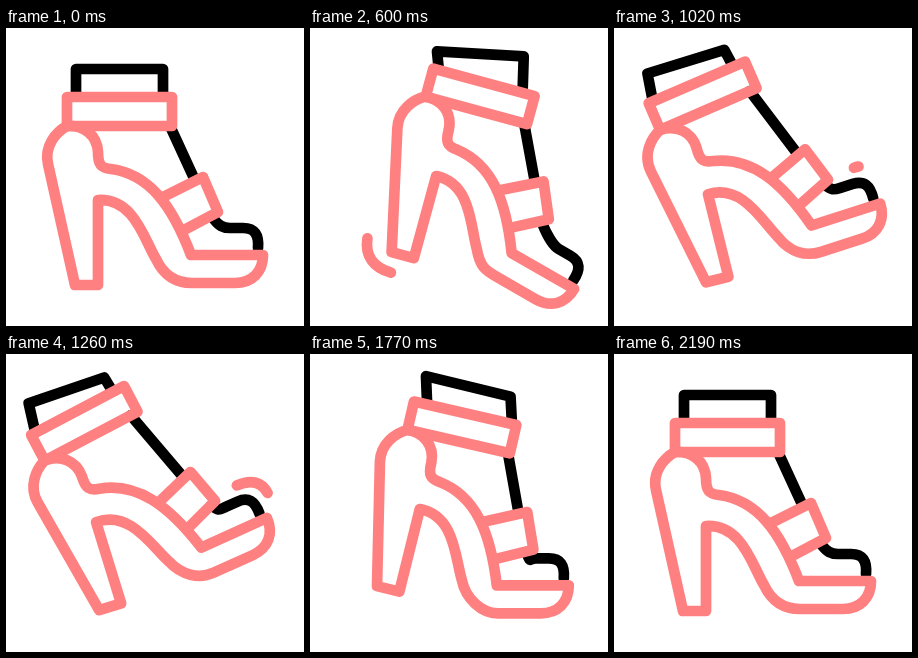
An HTML page for the animation above (2.25 s loop, 298 px wide and 298 px high).

```html
<!DOCTYPE html>
<html lang="en">
<head>
<meta charset="utf-8">
<title>Walking heel</title>
<style>
html, body { margin: 0; height: 100%; overflow: hidden; background: #fff; }
svg { display: block; width: 100%; height: 100%; }
path { fill: none; stroke: #ff8080; stroke-width: 10.7; stroke-linecap: round; stroke-linejoin: round; }
.ink { stroke: #000; }
</style>
</head>
<body>
<svg viewBox="0 0 298 298">
  <path id="sock" class="ink"/>
  <path id="shin" class="ink"/>
  <path id="toes" class="ink"/>
  <path id="strap"/>
  <path id="shoe"/>
  <path id="cuff"/>
  <path id="heelArc" pathLength="1"/>
  <path id="toeArc" pathLength="1"/>
</svg>
<script>
const LOOP = 2250, STEP = 30;
const times = [120, 630, 1170, 1740, 2190];

// Values at rest, heel up, toe up, heel up with flat toe; then back to rest.
const poses = {
  x: [110, 149.5, 99.5, 132.7],
  y: [150, 131.5, 142, 138],
  tilt: [0, 15.3, -18.4, 14],
  toeBend: [0, 14.7, -6.8, -14],
  cuffBend: [0, 0, -11, -1],
  leftX: [70, 60, 62.5, 66],
  leftY: [41, 51.5, 38.5, 41.4],
  rightX: [157, 145, 142, 153],
  rightY: [41, 33.5, 36, 41],
  legShift: [0, -4, -4, 4],
  shinShift: [0, -1, -6, 0],
  strapDrop: [0, 0, 3, 0]
};

// Progress of cubic-bezier(.5, 0, .5, 1) between two times.
function ease(t, from, to) {
  const x = Math.min(1, Math.max(0, (t - from) / (to - from)));
  let s = x;
  for (let i = 0; i < 6; i++) s -= (s * (1.5 - 1.5 * s + s * s) - x) / (1.5 - 3 * s + 3 * s * s);
  return s * s * (3 - 2 * s);
}

function poseAt(t) {
  let i = 0;
  while (i < 3 && t >= times[i + 1]) i++;
  const e = ease(t, times[i], times[i + 1]), pose = {};
  for (const key in poses) {
    const v = poses[key];
    pose[key] = v[i] + (v[(i + 1) % 4] - v[i]) * e;
  }
  return pose;
}

// Rigid frame: turns points around a pivot and moves the pivot to a place.
function rigid([px, py], [tx, ty], deg) {
  const c = Math.cos(deg * Math.PI / 180), s = Math.sin(deg * Math.PI / 180);
  return (x, y) => [tx + (x - px) * c - (y - py) * s, ty + (x - px) * s + (y - py) * c];
}

const part = id => document.getElementById(id);

function trim(id, t) {
  const end = ease(t, 180, 630), start = ease(t, 590, 900), el = part(id);
  el.style.visibility = end - start > 0.005 ? "visible" : "hidden";
  el.style.strokeDasharray = `${end - start} 2`;
  el.style.strokeDashoffset = -start;
}

function draw(t) {
  const p = poseAt(t);
  const b = rigid([110, 150], [p.x, p.y], p.tilt);
  const frames = {
    b,
    t: rigid([187, 227], b(187, 227), p.tilt + p.toeBend),
    c: rigid([61, 98], b(61, 98), p.tilt + p.cuffBend)
  };
  // Each point is prefixed by its frame: b body, t toe, c cuff.
  const set = (id, d) => part(id).setAttribute("d",
    d.replace(/([btc])(\S+) (\S+)/g, (_, f, x, y) => frames[f](+x, +y).map(n => n.toFixed(2))));

  set("sock", `M c${70 + p.legShift} 67 L b${p.leftX} ${p.leftY} L b${p.rightX} ${p.rightY} L c${157 + p.legShift} 67`);
  set("shin", `M c${164 + p.shinShift} 98 L b187 ${148 + p.strapDrop}`);
  set("toes", "M b207 190 C b213 198 t217 200 t224 200 L t237 200 C t249 200 t253 207 t252 220");
  const d = p.strapDrop;
  set("strap", `M b157 ${169 + d} L b197 ${149 + d} L b212 ${184 + d} L b178 ${202 + d}`);
  set("shoe", "M b61 98 C b50 104 b38 118 b42 136 L b69 257 L b92 257 L b92 172 " +
    "C b128 170 b138 211 b150 231 C b158 248 t170 255 t186 255 L t229 255 " +
    "C t246 255 t257 244 t257 227 L t185 227 C b166 177 b143 146 b105 141 " +
    "C b95 140 b92 137 b92 124 C b91 107 b78 97 b61 98 Z");
  set("cuff", "M c61 69 L c166 69 L c166 98 L c61 98 Z");
  set("heelArc", "M b42 250 C b44 268 b56 277 b74 277");
  set("toeArc", "M t243 185 C t259 185 t268 192 t268 207");
  trim("heelArc", t);
  trim("toeArc", t - 720);
}

const origin = performance.now();
function tick() {
  const t = (performance.now() - origin) % LOOP;
  draw(Math.floor(t / STEP) * STEP);
  requestAnimationFrame(tick);
}
tick();
</script>
</body>
</html>
```
